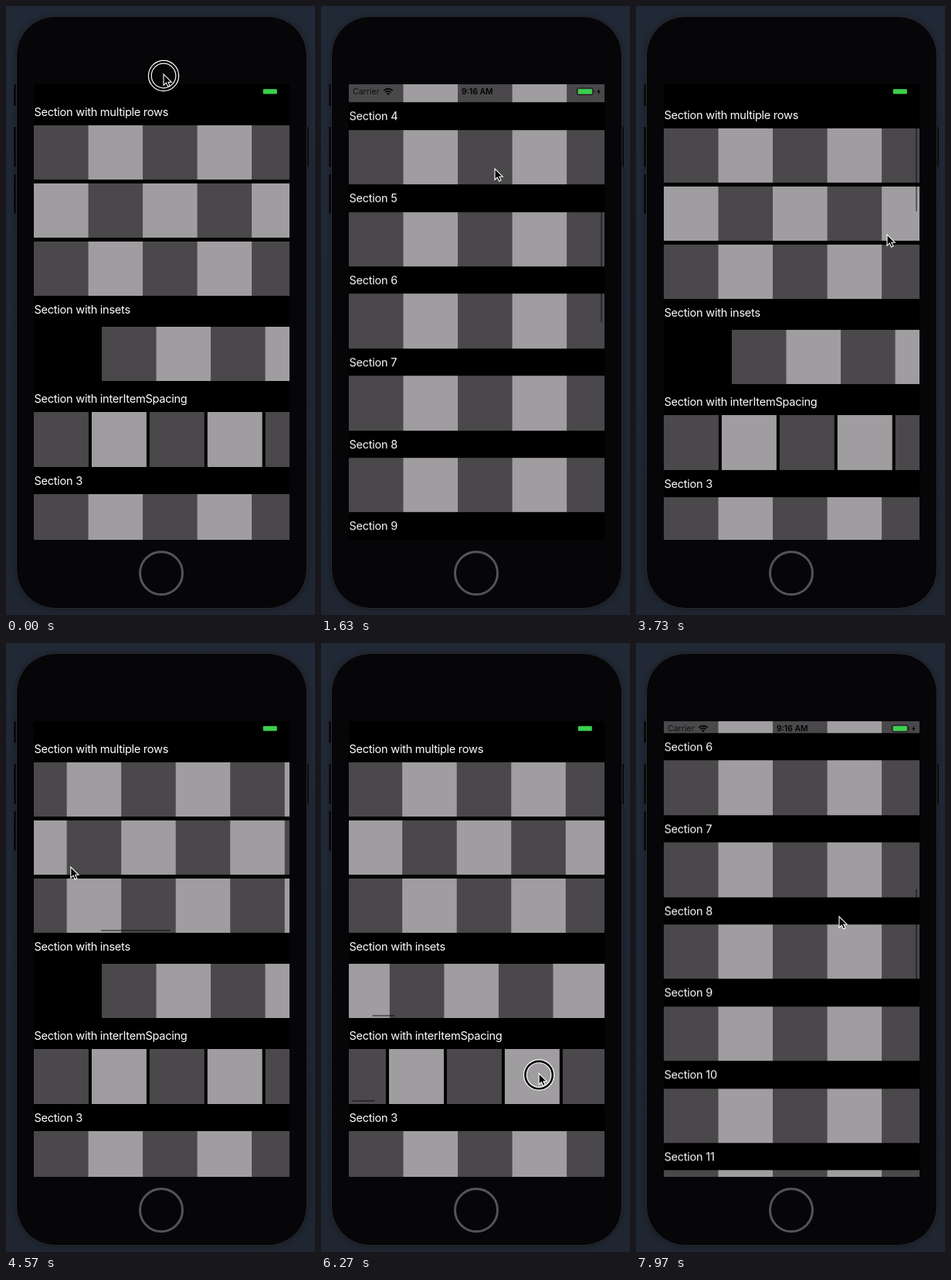
An HTML page that plays this animation: 400x786 px, repeating every 8 s.

```html
<!DOCTYPE html>
<html lang="en">
<head>
<meta charset="utf-8">
<title>Section scrolling</title>
<style>
  html, body { margin: 0; width: 100%; height: 100%; overflow: hidden; background: #1f2632; }
  body { font-family: Inter, Roboto, "Liberation Sans", sans-serif; }
  #stage { position: relative; width: 400px; height: 786px; overflow: hidden;
    background: linear-gradient(#222936, #1e2735 50%, #1f2631); }
  #stage div, #stage svg { position: absolute; box-sizing: border-box; }
  .key { background: #0b0c10; border: 1px solid #2a2d33; border-radius: 2px; }
  #body { left: 13px; top: 12.5px; width: 377px; height: 765px; border-radius: 51px;
    background: #060508; border: 1px solid #2b2b2e; box-shadow: 0 0 6px rgba(0, 0, 0, .35); }
  #home { left: 172px; top: 703px; width: 58px; height: 58px; border-radius: 50%; border: 3px solid #545355; }
  #screen { left: 36px; top: 101px; width: 330.6px; height: 588px; background: #000; overflow: hidden; }
  #list { left: 0; top: 0; width: 100%; will-change: transform; }
  .title { left: .5px; height: 35.26px; line-height: 36.4px; font-size: 14.6px; letter-spacing: -.28px;
    color: #fff; white-space: nowrap; }
  .rail { left: 0; width: 100%; overflow: hidden; }
  .strip { top: 0; height: 100%; }
  .line { height: 70.53px; width: 100%; }
  .bar { background: rgba(0, 0, 0, .42); border-radius: 1.1px; }
  .rail .bar { height: 2.2px; bottom: 2.6px; }
  #vbar { width: 2.2px; height: 144.5px; left: 325.8px; top: 0; }
  #status { left: 0; top: 0; width: 100%; height: 17.6px; font-size: 10.4px; line-height: 19px; color: #000; }
  #carrier { left: 5px; opacity: .8; letter-spacing: .1px; }
  #clock { left: 0; width: 100%; padding-left: 2px; text-align: center; font-weight: 600; }
  #status svg { left: 0; top: 0; }
</style>
</head>
<body>
<div id="stage">
  <div class="key" style="left:9px;top:100px;width:7px;height:30px"></div>
  <div class="key" style="left:9px;top:155px;width:7px;height:54px"></div>
  <div class="key" style="left:9px;top:216px;width:7px;height:53px"></div>
  <div class="key" style="left:386px;top:155px;width:7px;height:54px"></div>
  <div id="body"></div>
  <div id="home"></div>
  <div id="screen">
    <div id="list"></div>
    <div id="vbar" class="bar"></div>
    <div id="status">
      <div id="carrier">Carrier</div>
      <div id="clock">9:16 AM</div>
      <svg width="331" height="18">
        <g fill="none" stroke="#000" stroke-width="1.6">
          <path d="M45.2 8.2q5.8 -4.6 11.6 0M47.3 10.3q3.7 -2.9 7.4 0"/>
        </g>
        <path d="M49 12q2 -1.6 4 0l-2 2.2z"/>
        <rect x="295.5" y="5" width="20.5" height="8.6" rx="1.8" fill="none" stroke="#000" stroke-opacity=".75" stroke-width=".9"/>
        <path d="M317 7.6q1.6 1.6 0 3.4z"/>
        <rect x="296.8" y="6.2" width="18" height="6.3" rx=".8" fill="#3ad14c"/>
        <path d="M324.6 5.6l-3.4 4.4h2l-1 3.6 3.6 -4.6h-2.2z"/>
      </svg>
    </div>
  </div>
  <svg id="pointer" width="44" height="44" viewBox="-22 -22 44 44" style="left:-22px;top:-22px;overflow:visible">
    <g id="ring" fill="none">
      <circle cy="2" r="17.7" stroke="#fff" stroke-width="5"/>
      <circle cy="2" r="17.7" stroke="#000" stroke-width="2.6"/>
    </g>
    <path d="M0 0V14.2L3.3 11.1L5.5 16L8 14.9L5.9 10.2H10.2Z" fill="#000" stroke="#fff" stroke-width="1.1"/>
  </svg>
</div>
<script>
  const $ = id => document.getElementById(id);
  const PT = 330.6 / 375, LOOP = 8000;
  const DARK = '#4a484a', LIGHT = '#a09da0';
  const list = $('list');

  function add(parent, cls, css) {
    const el = document.createElement('div');
    el.className = cls;
    Object.assign(el.style, css);
    parent.append(el);
    return el;
  }
  const px = pt => pt * PT + 'px';

  // One horizontal section: title, clipped rail, strip of alternating cells.
  function section(name, y, { rows = 1, inset = 0, gap = 0, pad = 0 } = {}) {
    add(list, 'title', { top: px(y) }).textContent = name;
    const rail = add(list, 'rail', { top: px(y + 40 + pad), height: px(rows * 85 - 5) });
    const pitch = 80 + gap, cells = Math.ceil(50 / rows);
    const strip = add(rail, 'strip', { left: px(inset), width: px(cells * pitch) });
    for (let r = 0; r < rows; r++) {
      const [a, b] = r % 2 ? [LIGHT, DARK] : [DARK, LIGHT];
      const s = [80, pitch, pitch + 80].map(px);
      add(strip, 'line', {
        top: px(r * 85),
        background: `linear-gradient(90deg, ${a} ${s[0]}, #000 ${s[0]} ${s[1]}, ${b} ${s[1]} ${s[2]}, #000 ${s[2]})`,
        backgroundSize: px(pitch * 2) + ' 100%'
      });
    }
    const total = (cells * pitch + inset * 2) * PT;
    const bar = add(rail, 'bar', { left: 0, width: 325.3 * 330.6 / total + 'px', opacity: 0 });
    return (x, alpha) => {
      strip.style.transform = `translateX(${-x}px)`;
      bar.style.transform = `translateX(${2.6 + x / total * 325.3}px)`;
      bar.style.opacity = alpha;
    };
  }

  const multi = section('Section with multiple rows', 20, { rows: 3 });
  const insets = section('Section with insets', 310, { inset: 100, pad: 5 });
  const spaced = section('Section with interItemSpacing', 440, { gap: 5 });
  for (let n = 3; n < 20; n++) section('Section ' + n, 560 + 120 * (n - 3));

  // Pointer path: time, x, y, pressed until the next point.
  const path = [
    [0, 204, 88, 1], [70, 204, 88, 0], [270, 204, 88, 0],
    [980, 206, 590, 0], [1060, 206, 590, 1], [1380, 224, 214, 0],
    [1630, 225, 210, 0], [1900, 225, 210, 0], [2400, 214, 270, 0],
    [2620, 214, 270, 1], [2943, 230, 560, 0], [3730, 325, 295, 0],
    [4000, 322, 265, 0], [4100, 322, 265, 1], [4400, 60, 268, 0],
    [5200, 264.5, 449, 0], [5440, 264.5, 449, 1], [5490, 264.5, 449, 1],
    [5800, 60, 452, 0], [6130, 305, 555, 0], [6220, 305, 555, 1],
    [6500, 90, 560, 0], [6880, 203, 617, 0], [7050, 203, 617, 1],
    [7135, 203, 617, 1], [7400, 218, 228, 0], [7970, 263, 353, 0],
    [LOOP, 263, 353, 0]
  ];

  function pointer(t) {
    let i = 0;
    while (i < path.length - 2 && path[i + 1][0] <= t) i++;
    const [t0, x0, y0, down] = path[i], [t1, x1, y1] = path[i + 1];
    const p = Math.min(1, (t - t0) / (t1 - t0));
    const e = down ? p ** 1.3 : p * p * (3 - 2 * p);
    return { x: x0 + (x1 - x0) * e, y: y0 + (y1 - y0) * e, down };
  }

  // Follow the finger from t0 to t1, then coast a further distance.
  function glide(t, t0, t1, axis, coast, tau = 500) {
    if (t <= t0) return 0;
    const drag = pointer(t0)[axis] - pointer(Math.min(t, t1))[axis];
    return drag + (t > t1 ? coast * (1 - Math.exp((t1 - t) / tau)) : 0);
  }

  const down = t => glide(Math.min(t, 2620), 1060, 1380, 'y', 414.5, 380) + glide(t, 2620, 2943, 'y', -700);
  const left = down(2943);
  const hit = 2943 - 500 * Math.log(1 - left / 700);
  const speed = (700 - left) / 500;

  function scroll(t) {
    if (t >= 7135) return glide(t, 7135, 7400, 'y', 598);
    if (t < hit) return down(t);
    const d = t - hit;
    return -speed * d * Math.exp(-.0156 * d);
  }

  const clamp = v => Math.max(0, Math.min(1, v));
  const shown = (t, from, to) => t < from ? 0 : clamp((to - t) / 250);

  function draw(t) {
    const y = scroll(t), c = pointer(t);
    list.style.transform = `translateY(${-y}px)`;
    $('vbar').style.transform = `translateY(${19 + Math.max(0, y) * .2485}px)`;
    $('vbar').style.opacity = t < 7135 ? shown(t, 1070, 4250) : 1;
    multi(glide(t, 4100, 4400, 'x', 166.4), shown(t, 4110, 6000));
    insets(glide(t, 5490, 5800, 'x', 185), shown(t, 5495, 7000));
    spaced(glide(t, 6220, 6500, 'x', 312), shown(t, 6230, 7900));
    $('pointer').style.transform = `translate(${c.x}px, ${c.y}px)`;
    $('ring').style.display = c.down ? '' : 'none';
  }

  let start;
  function tick(now) {
    start ??= now;
    draw((now - start) % LOOP);
    requestAnimationFrame(tick);
  }
  draw(0);
  requestAnimationFrame(tick);
</script>
</body>
</html>
```
